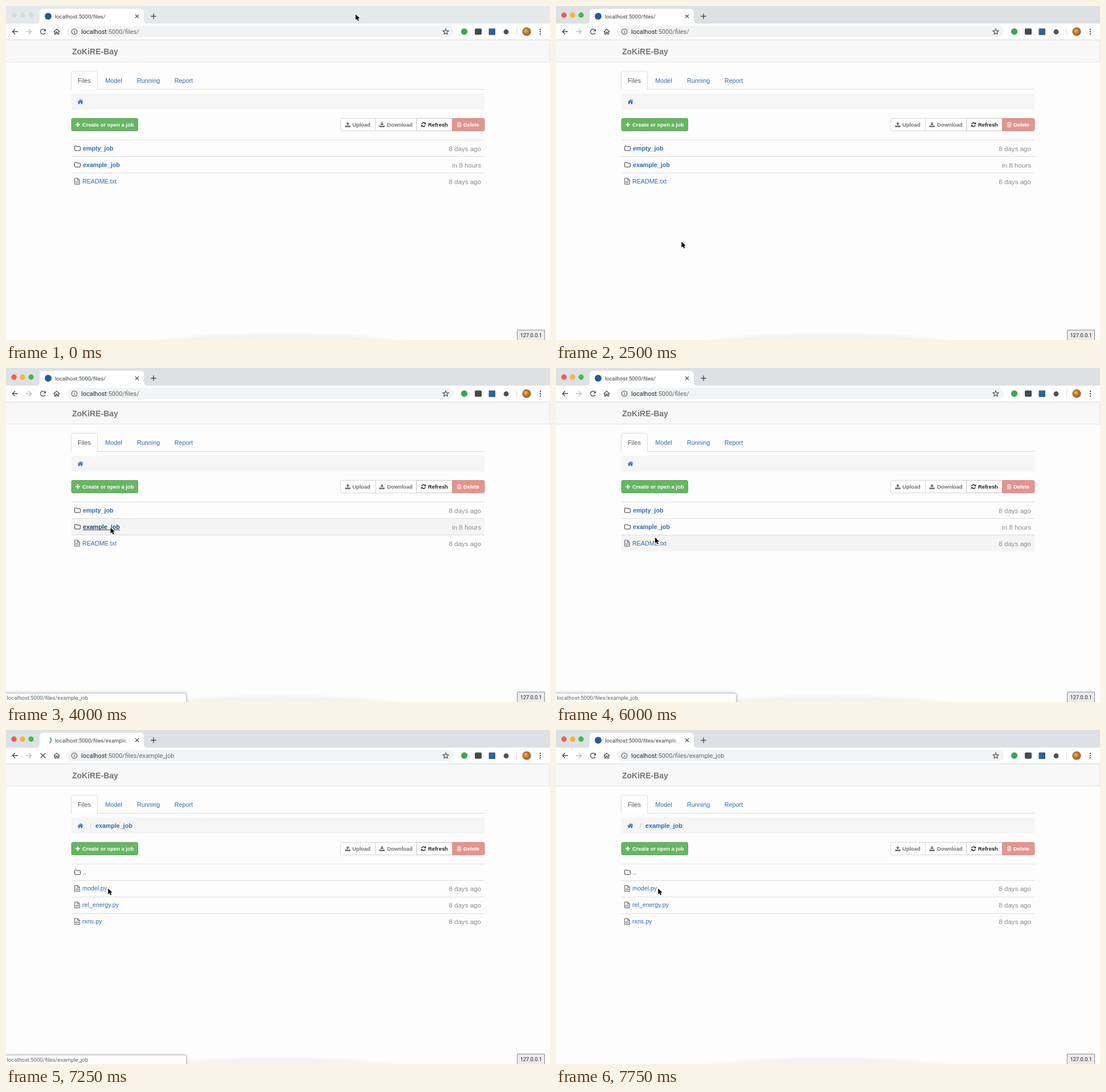
An HTML page with a canvas for the animation above (8000 ms loop, 955 px wide and 587 px high).

```html
<!DOCTYPE html>
<html lang="en">
<head>
<meta charset="utf-8">
<title>File browser</title>
<style>
html, body { margin: 0; width: 100%; height: 100%; overflow: hidden; background: #fdfdfd; }
canvas { display: block; width: 955px; height: 587px; }
</style>
</head>
<body>
<canvas id="stage"></canvas>
<script>
const W = 955, H = 587, LOOP = 8000;
const canvas = document.getElementById('stage');
const dpr = window.devicePixelRatio || 1;
canvas.width = W * dpr;
canvas.height = H * dpr;
const c = canvas.getContext('2d');

const PAGE = '"Liberation Sans", Arial, sans-serif';
const UI = 'Roboto, "Open Sans", sans-serif';
const LINK = '#2f6bb3', HOVER = '#23446f', LINE = '#dcdcdc', ICON = '#4b4e52';

// Pointer positions: [start ms, x, y]
const POINTER = [
  [0, 613.7, 14.4], [250, 545, 174], [500, 497, 181], [750, 287, 249],
  [1000, 199, 258], [1250, 170.4, 282.6], [1500, 170.4, 283.4], [1750, 207.5, 280],
  [2000, 222, 422], [2500, 220.4, 414.2], [2750, 199.5, 317], [3000, 196, 297.5],
  [3250, 193, 293.2], [3500, 193.2, 294], [3750, 183.6, 280.4], [6000, 173.8, 297.8],
  [6250, 177, 300.2], [6500, 178, 304.6], [6750, 179.3, 278.4]
];
// Hovered row and hovered link: [start ms, index], -1 for none
const ROW = [[0, -1], [2750, 2], [3250, 1], [6000, 2], [6750, 1], [7250, -1]];
const OVER = [[0, -1], [3750, 1], [6000, -1], [6250, 2], [6750, 1], [7250, -1]];

const at = (keys, t) => keys.filter(k => k[0] <= t).pop();

function text(str, x, y, size, color, { bold = false, font = PAGE, align = 'left' } = {}) {
  c.font = `${bold ? 'bold ' : ''}${size}px ${font}`;
  c.textAlign = align;
  c.fillStyle = color;
  c.fillText(str, x, y);
  return c.measureText(str).width;
}

function rect(x, y, w, h, color) {
  c.fillStyle = color;
  c.fillRect(x, y, w, h);
}

function box(x, y, w, h, r, fill, stroke) {
  c.beginPath();
  c.roundRect(x, y, w, h, r);
  if (fill) { c.fillStyle = fill; c.fill(); }
  if (stroke) { c.strokeStyle = stroke; c.lineWidth = 1; c.stroke(); }
}

function disc(x, y, r, color) {
  c.beginPath();
  c.arc(x, y, r, 0, Math.PI * 2);
  c.fillStyle = color;
  c.fill();
}

function arc(x, y, r, from, to, color, width) {
  c.beginPath();
  c.arc(x, y, r, from, to);
  c.strokeStyle = color;
  c.lineWidth = width;
  c.stroke();
}

// SVG path drawn around (x, y); stroked when a width is given
function shape(x, y, d, color, width) {
  const p = new Path2D(d);
  c.save();
  c.translate(x, y);
  if (width) {
    c.strokeStyle = color;
    c.lineWidth = width;
    c.stroke(p);
  } else {
    c.fillStyle = color;
    c.fill(p, 'evenodd');
  }
  c.restore();
}

function reloadIcon(x, y, r, color, width) {
  arc(x, y, r, 0.5, 5.4, color, width);
  shape(x, y, `M${r + .6} ${-r - .5}V-.5H${.5}Z`, color);
}

function starIcon(x, y) {
  let d = '';
  for (let i = 0; i < 10; i++) {
    const a = i * Math.PI / 5 - Math.PI / 2, r = i % 2 ? 2.4 : 5.3;
    d += `${i ? 'L' : 'M'}${r * Math.cos(a)} ${r * Math.sin(a)}`;
  }
  shape(x, y, d + 'Z', ICON, 1.1);
}

function folderIcon(y) {
  shape(120, y, 'M1.4 -4H4L5 -2.9H9.4Q10.4 -2.9 10.4 -2V3Q10.4 4 9.4 4H1.5Q.6 4 .6 3V-3Q.6 -4 1.4 -4Z', '#333', 1);
}

function fileIcon(y) {
  shape(120, y, 'M.6 -5.2H6L9.2 -2.2V5.2H.6ZM5.8 -5V-2H9', '#444', .9);
  shape(120, y, 'M3.8 -.2L2.2 1.5L3.8 3.2M6.1 -.2L7.7 1.5L6.1 3.2M5.4 -.5L4.5 3.5', '#444', .8);
}

function trayIcon(x, y, color, up) {
  shape(x, y, 'M-4.6 1.6H-1.8L-1 2.6H1L1.8 1.6H4.6V4.4H-4.6Z', color);
  shape(x, y, up ? 'M0 -4.6L3.3 -1.3H1.1V1.4H-1.1V-1.3H-3.3Z' : 'M0 1.8L3.3 -1.4H1.1V-4.4H-1.1V-1.4H-3.3Z', color);
}

function drawTabStrip(t, active, loading, opened) {
  rect(0, 0, W, 31, active ? '#dde0e5' : '#e6e9ec');
  const lights = active ? ['#ee5c50', '#f5b731', '#3dbf45'] : Array(3).fill('#dadcde');
  lights.forEach((color, i) => disc(14 + 15 * i, 16, 4.7, color));

  shape(0, 0, 'M53 31Q59 31 59 25V11Q59 5 65 5H236Q242 5 242 11V25Q242 31 248 31Z', '#fff');
  if (loading) arc(74, 18, 5.2, -1 + (t - 7250) / 250 * 1.6, 1.2 + (t - 7250) / 250 * 1.6, '#3b78d8', 1.6);
  else disc(74, 18, 6, '#235a97');

  c.save();
  c.beginPath();
  c.rect(80, 6, 138, 24);
  c.clip();
  text('localhost:5000/files/' + (opened ? 'example_job' : ''), 86, 21.5, 9.65, '#3c4043', { font: UI });
  if (opened) {
    const fade = c.createLinearGradient(203, 0, 218, 0);
    fade.addColorStop(0, 'rgba(255,255,255,0)');
    fade.addColorStop(1, '#fff');
    rect(203, 8, 15, 20, fade);
  }
  c.restore();
  shape(230, 18, 'M-3 -3L3 3M3 -3L-3 3', ICON, 1.2);
  shape(259, 18, 'M-4.7 0H4.7M0 -4.7V4.7', ICON, 1.4);
}

function drawToolbar(loading, opened) {
  rect(0, 31, W, 28, '#fff');
  shape(16, 45, 'M5 0H-4.4M0 -4.6L-4.6 0L0 4.6', ICON, 1.4);
  shape(40, 45, 'M-5 0H4.4M0 -4.6L4.6 0L0 4.6', '#bcbec1', 1.4);
  if (loading) shape(65, 45, 'M-4.3 -4.3L4.3 4.3M4.3 -4.3L-4.3 4.3', ICON, 1.4);
  else reloadIcon(65, 45, 4.4, ICON, 1.4);
  shape(89, 45, 'M-5.2 .4L0 -4.4L5.2 .4M-3.5 -.8V4.3H-1.2V1H1.2V4.3H3.5V-.8', ICON, 1.3);

  box(107, 35, 679, 20, 10, '#f1f3f4');
  arc(120, 45, 4.8, 0, 7, '#55585c', 1.1);
  rect(119.4, 44.3, 1.2, 3.4, '#55585c');
  rect(119.4, 42.2, 1.2, 1.2, '#55585c');
  const hostW = text('localhost', 132, 49, 11, '#26282b', { font: UI });
  text(':5000/files/' + (opened ? 'example_job' : ''), 132 + hostW, 49, 11, '#63676b', { font: UI });
  starIcon(772, 45.3);

  disc(804.5, 45, 5.7, '#3aa853');
  box(823, 39.5, 12, 11, 2, '#45484c');
  box(847.5, 39.5, 11.5, 11.5, 1, '#2f5f9e');
  disc(878, 45.5, 4.4, '#4c4f53');
  rect(896, 38, 1, 13, '#d4d6d8');
  const photo = c.createRadialGradient(912, 43, 1, 914, 45, 8);
  photo.addColorStop(0, '#e8b54a');
  photo.addColorStop(.55, '#c46a2c');
  photo.addColorStop(1, '#7c6a2e');
  disc(914, 45, 7.6, photo);
  for (const dy of [-4, 0, 4]) disc(938, 45 + dy, 1.2, ICON);
}

function drawButtons() {
  box(115, 197.5, 116.5, 22, 2.5, '#67b565', '#57a757');
  shape(126, 208.5, 'M-3.8 0H3.8M0 -3.8V3.8', '#fff', 2.2);
  const label = (str, x, color) => text(str, x, 212, 9.35, color, { bold: true });
  label('Create or open a job', 134, '#fff');

  box(587.5, 197.5, 252, 22, 2.5, '#fff', '#d6d6d6');
  rect(648, 198, 1, 21, '#d6d6d6');
  box(720.5, 197.5, 63, 22, 0, '#fff', '#c4c4c4');
  box(783.5, 197.5, 56.5, 22, [0, 2.5, 2.5, 0], '#e2958e', '#dd8c86');
  trayIcon(600, 208.5, '#707070', true);
  label('Upload', 608, '#707070');
  trayIcon(660, 208.5, '#707070', false);
  label('Download', 669, '#707070');
  arc(733, 208.5, 3.3, 3.4, 5.7, '#222', 1.4);
  arc(733, 208.5, 3.3, .25, 2.55, '#222', 1.4);
  shape(733, 208.5, 'M4.3 -4.2V-.8H.9ZM-4.3 4.2V.8H-.9Z', '#222');
  label('Refresh', 741, '#222');
  shape(795.5, 208.5, 'M-3.6 -2.7H3.6M-1.2 -2.9V-4H1.2V-2.9M-2.7 -2.4V3.9H2.7V-2.4M-.9 -1V2.6M.9 -1V2.6', '#fff', .9);
  label('Delete', 803, '#fff');
}

function drawHeader(opened) {
  rect(0, 59, W, 40, '#f8f8f8');
  rect(0, 59, W, 1, '#d9d9d9');
  rect(0, 98, W, 1, '#e4e4e4');
  rect(954, 60, 1, 38, '#e4e4e4');
  text('ZoKiRE-Bay', 116, 85, 14, '#757575', { bold: true });

  rect(115, 146, 725, 1, LINE);
  box(114.5, 114.5, 46, 34, [3, 3, 0, 0], '#fff', LINE);
  rect(114, 147, 48, 3, '#fdfdfd');
  text('Files', 126, 134.7, 10.8, '#555');
  text('Model', 174.3, 134.7, 10.8, LINK);
  text('Running', 230, 134.7, 10.8, LINK);
  text('Report', 295.7, 134.7, 10.8, LINK);

  box(115, 154, 725, 28, 3, '#f5f5f5');
  shape(130.5, 168.3, 'M-5 .2L0 -4.2L2.3 -2.2V-3.6H3.7V-1L5 .2L4.4 .9L0 -2.9L-4.4 .9ZM-3.6 1L0 -2L3.6 1V4H1V1.4H-1V4H-3.6Z', LINK);
  if (opened) {
    text('/', 147, 172, 10.8, '#bbb');
    text('example_job', 157, 172, 10.7, LINK, { bold: true });
  }
}

function drawEntry(name, when, y, { folder, plain, over } = {}) {
  (folder ? folderIcon : fileIcon)(y);
  const color = plain ? '#444' : over ? HOVER : LINK;
  const x = folder ? 135 : 134;
  const w = text(name, x, y + 3.8, 10.7, color, { bold: folder && !plain });
  if (over) rect(x, y + 5, w, 1, color);
  if (when) text(when, 834, y + 4.6, 11.6, '#8b8b8b', { align: 'right' });
}

function drawList(t, opened) {
  const row = at(ROW, t)[1], over = at(OVER, t)[1];
  if (row >= 0) rect(115, 236 + 29 * row, 725, 28, '#f4f4f4');
  const lines = opened ? [235, 264, 293, 322] : [235, 264, 293];
  lines.forEach(y => rect(115, y, 725, 1, LINE));
  if (opened) {
    drawEntry('..', '', 250, { folder: true, plain: true });
    ['model.py', 'rel_energy.py', 'rxns.py'].forEach((name, i) => drawEntry(name, '8 days ago', 278.5 + 29 * i));
  } else {
    drawEntry('empty_job', '8 days ago', 250, { folder: true, over: over === 0 });
    drawEntry('example_job', 'in 8 hours', 279, { folder: true, over: over === 1 });
    drawEntry('README.txt', '8 days ago', 308, { over: over === 2 });
  }
}

function drawFooter(t) {
  c.save();
  c.translate(478, 589);
  c.scale(1, .07);
  const glow = c.createRadialGradient(0, 0, 150, 0, 0, 230);
  glow.addColorStop(0, 'rgba(0,0,0,.04)');
  glow.addColorStop(1, 'rgba(0,0,0,0)');
  rect(-240, -240, 480, 240, glow);
  c.restore();

  if (t >= 4000 && t < 7500) {
    c.save();
    c.shadowColor = 'rgba(0,0,0,.35)';
    c.shadowBlur = 5 * dpr;
    box(-4, 571.5, 320.5, 20, [0, 3, 0, 0], '#fff');
    c.restore();
    box(-4, 571.5, 320.5, 20, [0, 3, 0, 0], '#fdfdfd', '#c6c6c6');
    const target = t >= 6250 && t < 6750 ? 'README.txt' : 'example_job';
    text('localhost:5000/files/' + target, 1.5, 582.6, 9.62, '#606367', { font: UI });
  }
  box(897.5, 569.5, 48, 20, 0, '#ebebeb', '#8c8c8c');
  text('127.0.0.1', 921.8, 581.8, 9.2, '#222', { font: UI, align: 'center' });
}

function drawPointer(t) {
  const [, x, y] = at(POINTER, t);
  const d = 'M0 0V10.2L2.4 8L4.1 11.9L5.9 11.1L4.2 7.3H7.3Z';
  shape(x, y, d, '#fff', 1.6);
  shape(x, y, d, '#000');
}

function draw(t) {
  const active = t >= 2500, opened = t >= 7250, loading = t >= 7000 && t < 7750;
  c.setTransform(dpr, 0, 0, dpr, 0, 0);
  rect(0, 0, W, H, '#fdfdfd');
  drawTabStrip(t, active, loading, opened);
  drawToolbar(loading, opened);
  drawHeader(opened);
  drawButtons();
  drawList(t, opened);
  drawFooter(t);
  drawPointer(t);
}

const start = performance.now();
function tick() {
  const t = (performance.now() - start) % LOOP;
  draw(Math.floor(t / 250) * 250);
  requestAnimationFrame(tick);
}
tick();
</script>
</body>
</html>
```
